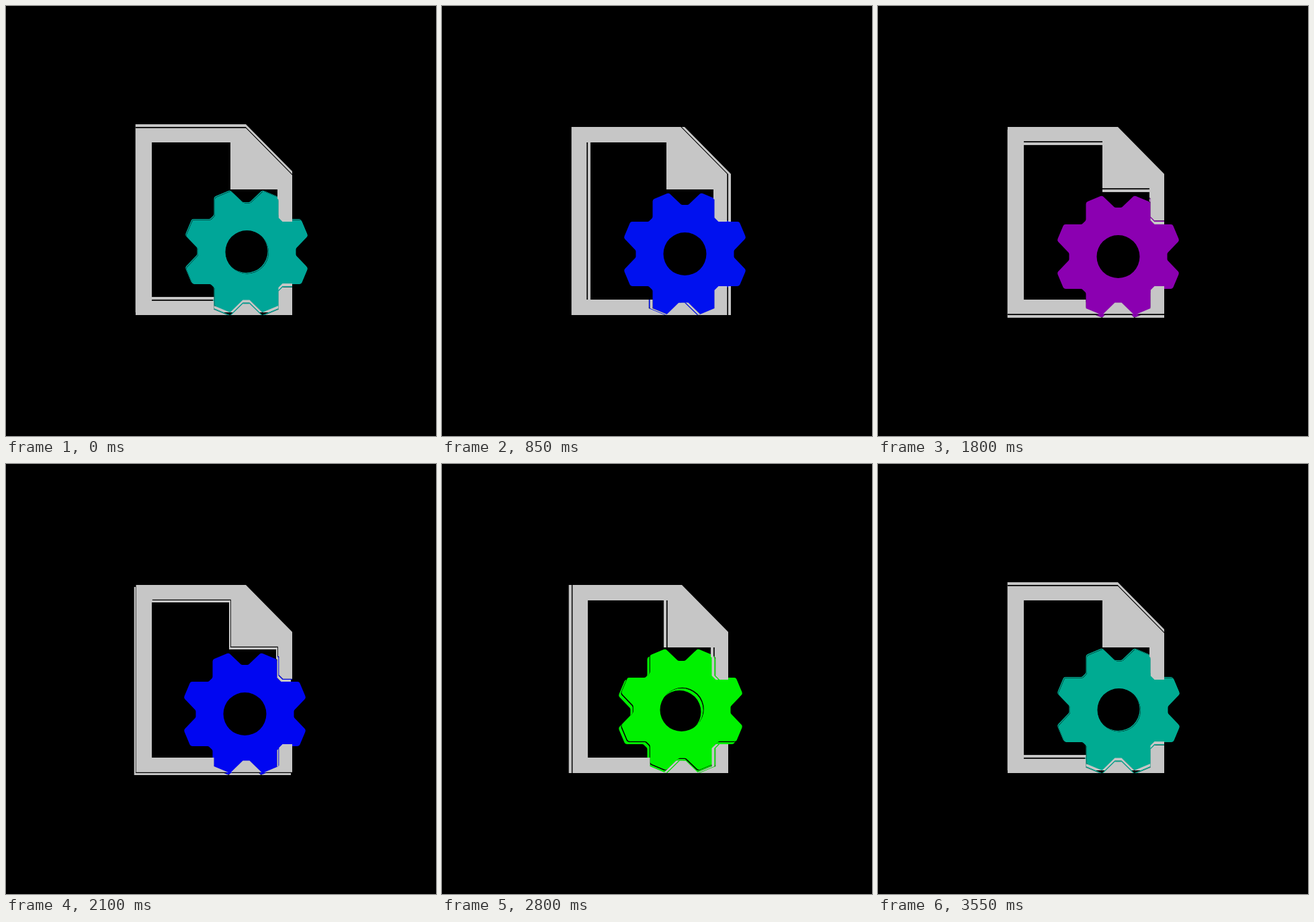
These frames come from a looping animation (640 by 640 pixels, 3600 ms). An HTML page with a canvas:

```html
<!DOCTYPE html>
<html lang="en">
<head>
<meta charset="utf-8">
<title>File settings icon</title>
<style>
  html, body { margin: 0; width: 100%; height: 100%; overflow: hidden; background: #000; }
  canvas { display: block; }
</style>
</head>
<body>
<canvas id="stage" width="640" height="640"></canvas>
<script>
const ctx = document.getElementById('stage').getContext('2d');
const LOOP = 3600, STEP = 50, ORBIT = 4.5, GAP = .42, GRAY = '#c6c6c6';
const CENTER = [357.5, 369];

// [time, value] pairs, linear in between
const HUE = [[0, .465], [870, 1], [1350, 1.38], [1650, 1.6], [2100, .998], [2800, 0], [3600, .465]];
const LEAD = [[0, 20], [850, 0], [1350, -31], [2100, 0], [2400, 30], [2800, 51], [3600, 20]];

function sample(stops, t) {
  const i = stops.findIndex(s => s[0] > t);
  const [t0, v0] = stops[i - 1], [t1, v1] = stops[i];
  return v0 + (v1 - v0) * (t - t0) / (t1 - t0);
}

// 0 is green, 1 is blue, 2 is red
function hueColor(u) {
  const level = x => Math.round(241 * Math.max(0, x) ** .6);
  return `rgb(${level(u - 1)},${level(1 - u)},${level(1 - Math.abs(u - 1))})`;
}

function makeGear() {
  const quarter = [[5, 73], [24, 91], [48, 81], [48, 54], [54, 48], [81, 48], [91, 24], [73, 5]];
  const points = [];
  for (let turn = 0; turn < 4; turn++) {
    for (let [x, y] of quarter) {
      for (let k = 0; k < turn; k++) [x, y] = [y, -x];
      points.push([CENTER[0] + x, CENTER[1] + y]);
    }
  }
  const path = new Path2D(), n = points.length;
  path.moveTo((points[0][0] + points[n - 1][0]) / 2, (points[0][1] + points[n - 1][1]) / 2);
  points.forEach((p, i) => path.arcTo(...p, ...points[(i + 1) % n], 4));
  path.closePath();
  path.moveTo(CENTER[0] + 32, CENTER[1]);
  path.arc(...CENTER, 32, 0, 7);
  return path;
}

const gear = makeGear();
const page = new Path2D(`
  M192.7 180H357L426 250V321H411.5L405.5 315V288L404 287V273H334V203H217V437H309.5V450L333.5 460H192.7Z
  M333.5 460L352.5 441.5H362.5L381.5 460Z
  M381.5 460L405.5 450V423L411.5 417H426V460Z`);

function fillAt(path, [x, y], color) {
  ctx.save();
  ctx.translate(x, y);
  ctx.fillStyle = color;
  ctx.fill(path, 'evenodd');
  ctx.restore();
}

// Front copy over a displaced back copy, with a thin gap along the edges facing it
function drawPair(path, back, front, color, gapColor) {
  const dx = front[0] - back[0], dy = front[1] - back[1];
  fillAt(path, back, color);
  if (!dx && !dy) return;
  ctx.save();
  ctx.translate(...front);
  ctx.clip(path, 'evenodd');
  fillAt(path, [0, 0], '#000');
  if (gapColor) {
    ctx.strokeStyle = gapColor;
    ctx.lineWidth = 3;
    ctx.stroke(gear);
  }
  fillAt(path, [dx * GAP, dy * GAP], color);
  ctx.restore();
}

// Positions snap to whole pixels
function orbit(degrees, radius) {
  const a = degrees * Math.PI / 180;
  return [Math.trunc(radius * Math.sin(a)), Math.trunc(-radius * Math.cos(a))];
}

function draw(now) {
  const t = Math.floor(now % LOOP / STEP) * STEP;
  const angle = t / LOOP * 360, lead = sample(LEAD, t);
  const offset = orbit(angle, ORBIT);
  const gearFront = orbit(angle + lead, ORBIT - Math.abs(lead) / 50);
  const color = hueColor(sample(HUE, t));

  ctx.fillStyle = '#000';
  ctx.fillRect(0, 0, 640, 640);
  drawPair(gear, offset, gearFront, color);
  drawPair(page, offset, [0, 0], GRAY, color);
}

const start = performance.now();
function tick() {
  draw(performance.now() - start);
  requestAnimationFrame(tick);
}
tick();
</script>
</body>
</html>
```
